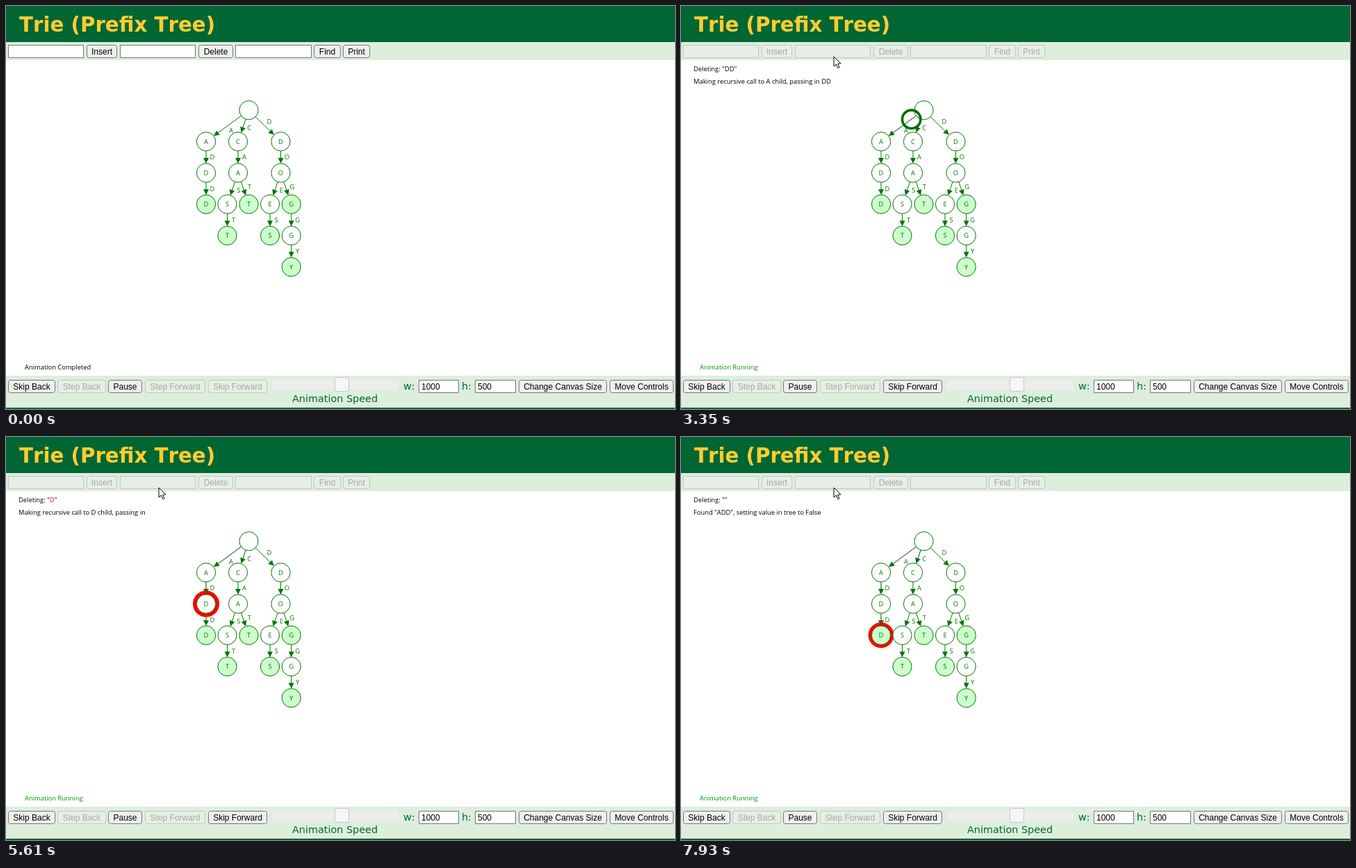
Animation, 963 px wide and 581 px high, one loop 8000 ms. Source, as an HTML page with a canvas:

```html
<!DOCTYPE html>
<html lang="en">
<head>
<meta charset="utf-8">
<title>Trie</title>
<style>
html, body { margin: 0; width: 100%; height: 100%; overflow: hidden; background: #fff; }
canvas { display: block; }
</style>
</head>
<body>
<canvas id="stage" width="963" height="581"></canvas>
<script>
const ctx = document.getElementById('stage').getContext('2d');
const LOOP = 8000, STEP = 690, R = 13.6;
const GREEN = '#007700', DARK = '#063', PALE = '#ddeedd';
const SMALL = '9.35px "Open Sans", "Noto Sans", sans-serif';
const UI = '12px "Liberation Sans", Arial, sans-serif';
const LABEL = '14.4px "DejaVu Sans", Verdana, sans-serif';
const TITLE = 'bold 29.3px "DejaVu Sans", Verdana, sans-serif';

// Moments of the run
const MOVE = 0, CLICK = 720, KEYS = [980, 1310, 1440], SUBMIT = 1770, RUN = 1840;
const FIRST = 2490, HOPS = [3151, 4531, 5911], FOUND = 7291;

// letter, x, row, parent index, word end
const nodes = [
  ['', 349.5, 0], ['A', 288, 1, 0], ['C', 334, 1, 0], ['D', 395.5, 1, 0],
  ['D', 288, 2, 1], ['A', 334, 2, 2], ['O', 395.5, 2, 3],
  ['D', 288, 3, 4, 1], ['S', 318.5, 3, 5], ['T', 349.5, 3, 5, 1],
  ['E', 380, 3, 6], ['G', 410.7, 3, 6, 1],
  ['T', 318.5, 4, 8, 1], ['S', 380, 4, 10, 1], ['G', 410.7, 4, 11], ['Y', 410.7, 5, 14, 1]
].map(([letter, x, row, parent, end]) => ({ letter, x, y: 150.2 + row * 45.2, parent, end }));
const path = [0, 1, 4, 7].map(i => nodes[i]);
// Edges the marker has passed keep a darker line
const darkFrom = { 1: HOPS[0] + 200, 2: HOPS[0] + 200, 4: HOPS[1] + 400, 7: HOPS[2] + 200 };

function rect(x, y, w, h, color) {
  ctx.fillStyle = color;
  ctx.fillRect(x, y, w, h);
}

function text(s, x, y, font, color, align = 'left') {
  ctx.font = font;
  ctx.fillStyle = color;
  ctx.textAlign = align;
  ctx.fillText(s, x, y);
}

function box(x, y, right, fill, stroke, radius, width = 1, h = 19) {
  ctx.beginPath();
  ctx.roundRect(x + .5, y + .5, right - x - 1, h - 1, radius);
  ctx.fillStyle = fill;
  ctx.fill();
  ctx.strokeStyle = stroke;
  ctx.lineWidth = width;
  ctx.stroke();
}

function control(x, y, right, on, face, radius) {
  box(x, y, right, on ? face : 'rgba(239,239,239,.5)', on ? '#767676' : 'rgba(118,118,118,.3)', radius);
}

function button(label, x, right, y, on = true) {
  control(x, y, right, on, '#efefef', 3);
  text(label, (x + right) / 2, y + 14, UI, on ? '#000' : 'rgba(16,16,16,.3)', 'center');
}

function disc(x, y, r, fill, stroke, width = 1) {
  ctx.beginPath();
  ctx.arc(x, y, r, 0, 2 * Math.PI);
  if (fill) { ctx.fillStyle = fill; ctx.fill(); }
  if (stroke) { ctx.strokeStyle = stroke; ctx.lineWidth = width; ctx.stroke(); }
}

function polygon(points) {
  ctx.beginPath();
  points.forEach(([x, y]) => ctx.lineTo(x, y));
  ctx.closePath();
}

function edge(a, b, lineColor) {
  const len = Math.hypot(b.x - a.x, b.y - a.y);
  const ux = (b.x - a.x) / len, uy = (b.y - a.y) / len;
  const at = (along, side) => [b.x - ux * along + uy * side, b.y - uy * along - ux * side];
  ctx.beginPath();
  ctx.moveTo(a.x, a.y);
  ctx.lineTo(...at(R + 4, 0));
  ctx.strokeStyle = lineColor;
  ctx.lineWidth = 1;
  ctx.stroke();
  polygon([at(R, 0), at(R + 8, 4), at(R + 8, -4)]);
  ctx.fillStyle = GREEN;
  ctx.fill();
  const [x, y] = at(len / 2, 9);
  text(b.letter, x, y + 3.3, SMALL, GREEN, 'center');
}

function drawTree(t) {
  nodes.forEach((n, i) => {
    if (i) edge(nodes[n.parent], n, t >= darkFrom[i] ? '#004000' : GREEN);
  });

  // hop: the latest move begun; -1 while the root is current
  const hop = HOPS.filter(h => t >= h).length - 1;
  const part = hop < 0 ? 1 : (t - HOPS[hop]) / STEP;
  if (t >= FIRST && part >= 1) {
    const wave = Math.abs(((t - 4060 + 2 * 1757) / 1757 % 1) * 2 - 1);
    const { x, y } = path[hop + 1];
    disc(x, y, R + 2.7 + 3.6 * wave, '#f00');
  }
  for (const n of nodes) {
    disc(n.x, n.y, R, n.end ? '#ccffcc' : '#fff', GREEN);
    text(n.letter, n.x, n.y + 3.3, SMALL, GREEN, 'center');
  }
  if (part < 1) {
    const a = path[hop], b = path[hop + 1];
    disc(a.x + (b.x - a.x) * part, a.y + (b.y - a.y) * part, 13.2, null, '#006c00', 3.6);
  }
}

function drawMessages(t) {
  const running = t >= RUN;
  text(running ? 'Animation Running' : 'Animation Completed', 27, 524, SMALL, running ? '#009600' : '#000');
  if (!running) return;

  const word = 'ADD'.slice(HOPS.filter(h => t >= h).length);
  const stop = HOPS.filter(h => t >= h + STEP).length;
  const waiting = t >= FIRST && word.length === 3 - stop;
  let x = 18;
  [['Deleting: "', '#000'], [word.slice(0, 1), waiting ? '#f00' : '#000'], [word.slice(1) + '"', '#000']]
    .forEach(([s, color]) => {
      text(s, x, 94, SMALL, color);
      x += ctx.measureText(s).width;
    });

  let note = '';
  if (t >= FOUND) note = 'Found "ADD", setting value in tree to False';
  else if (t >= FIRST && stop < 3)
    note = `Making recursive call to ${'ADD'[stop]} child, passing in ${'ADD'.slice(stop + 1)}`;
  text(note, 18, 112, SMALL, '#000');
}

function drawPage(t) {
  rect(0, 0, 963, 581, '#fff');
  rect(0, 0, 963, 52, DARK);
  rect(0, 52, 963, 26, PALE);
  rect(0, 533, 963, 46, PALE);
  rect(0, 579, 963, 2, DARK);
  text('Trie (Prefix Tree)', 19, 37, TITLE, '#ffcc33');

  const idle = t < SUBMIT;
  [[3, 112], [164, 273], [330, 440]].forEach(([x, right]) => control(x, 56, right, idle, '#fff', 0));
  [['Insert', 116, 160], ['Delete', 277, 327], ['Find', 443, 482], ['Print', 485, 524]]
    .forEach(([label, x, right]) => button(label, x, right, 56, idle));
  if (idle && t >= CLICK) {
    box(164, 56, 273, '#fff', '#000', 1, 2);
    const typed = 'add'.slice(0, KEYS.filter(k => t >= k).length);
    text(typed, 168, 70, UI, '#000');
    rect(Math.round(168 + ctx.measureText(typed).width) - 1, 59, 1, 13, '#000');
  }

  button('Skip Back', 3, 71, 539);
  button('Step Back', 74, 144, 539, false);
  button('Pause', 147, 196, 539);
  button('Step Forward', 200, 287, 539, false);
  button('Skip Forward', 291, 376, 539, !idle);
  button('Change Canvas Size', 738, 865, 539);
  button('Move Controls', 869, 961, 539);
  rect(383, 539, 182, 14, '#ededed');
  box(473, 535, 494, '#f6f6f6', '#c5c5c5', 3, 1, 21);
  text('Animation Speed', 473.5, 571, LABEL, DARK, 'center');
  [['w:', 572, 594, 652, '1000'], ['h:', 656, 675, 734, '500']].forEach(([label, x, left, right, value]) => {
    text(label, x, 553, LABEL, DARK);
    control(left, 539, right, true, '#fff', 0);
    text(value, left + 4, 553, UI, '#000');
  });
}

function drawPointer(t) {
  if (t < 70) return;
  const p = Math.min(1, (t - 70) / 580), ease = p * p * (3 - 2 * p);
  const x = 734 + (220 - 734) * ease, y = 498 + (73 - 498) * ease;
  if (p === 1 && t < SUBMIT) {
    rect(220.5, 67, 1, 13, '#000');
    [66, 80].forEach(row => {
      rect(218, row, 2, 1, '#000');
      rect(222, row, 2, 1, '#000');
    });
    return;
  }
  polygon([[0, 0], [0, 14], [3.3, 11], [5.8, 16.5], [8, 15.5], [5.6, 10.2], [10, 10]]
    .map(([dx, dy]) => [x + dx, y + dy]));
  ctx.fillStyle = '#fff';
  ctx.fill();
  ctx.strokeStyle = '#000';
  ctx.lineWidth = 1;
  ctx.stroke();
}

function frame(now) {
  const t = now % LOOP;
  ctx.fontKerning = 'none';
  drawPage(t);
  drawTree(t);
  drawMessages(t);
  drawPointer(t);
  requestAnimationFrame(frame);
}
requestAnimationFrame(frame);
</script>
</body>
</html>
```
